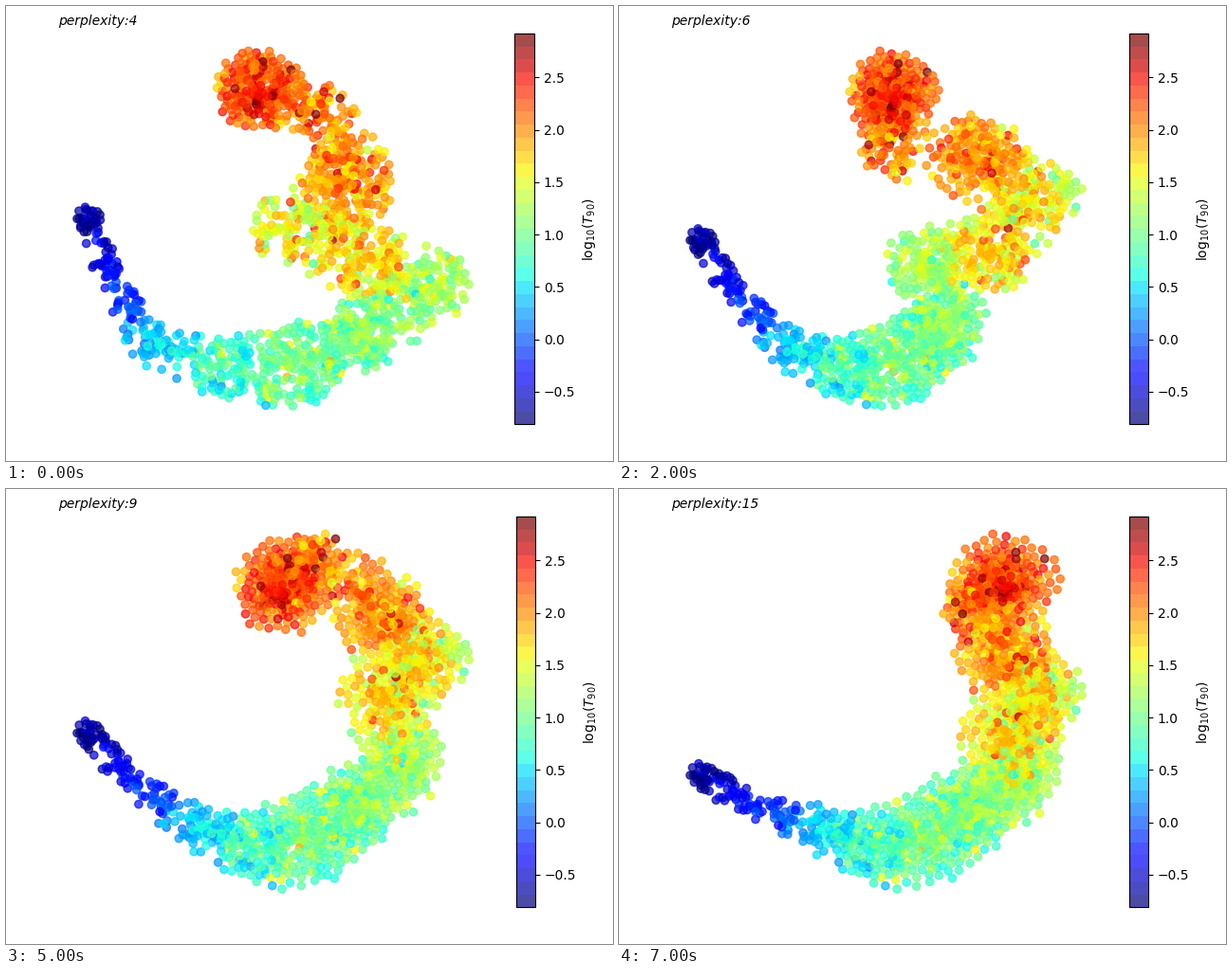
A matplotlib script that plays this animation: 640 px wide and 480 px high, repeating every 8 s.

```python
import numpy as np
import matplotlib.pyplot as plt
from matplotlib.animation import FuncAnimation

W, H, DPI = 640, 480, 100
PERPLEXITY = [4, 5, 6, 7, 8, 9, 10, 15]
STEPS = len(PERPLEXITY)
XLIM, YLIM = (75, 488), (47.5, 422)
VMIN, VMAX = -0.813, 2.921

# bends of the chain of points, from the shortest bursts to the longest
BENDS = {
    0: [(98, 218), (160, 352), (380, 342), (452, 290), (375, 262),
        (295, 228), (365, 180), (340, 103), (270, 80)],
    1: [(92, 228), (182, 356), (400, 345), (365, 295), (440, 262),
        (325, 220), (400, 170), (350, 98), (278, 80)],
    2: [(98, 240), (188, 357), (355, 335), (322, 262), (392, 255),
        (455, 195), (390, 155), (290, 142), (295, 82)],
    3: [(90, 203), (165, 338), (345, 360), (420, 318), (382, 268),
        (448, 222), (393, 168), (303, 142), (318, 88)],
    5: [(88, 268), (197, 366), (370, 342), (420, 300), (385, 228),
        (448, 195), (393, 150), (325, 80), (287, 118)],
    7: [(91, 309), (205, 368), (358, 345), (405, 315), (385, 265),
        (430, 225), (392, 180), (355, 118), (390, 92)],
}

# clumps along the chain: three to each of the first two links, then one per bend
CLUMP_AT = np.r_[np.arange(6) / 3, np.arange(2, 9)]
COUNT = [40, 38, 30, 60, 90, 170, 150, 110, 150, 100, 190, 75, 220]
RADIUS = [15, 16, 16, 25, 34, 46, 40, 35, 43, 33, 48, 28, 42]
VALUE = [-.62, -.35, 0, .45, .72, .98, 1.15, 1.25, 1.75, 1.55, 1.98, 2.08, 2.33]
CLUMPS = np.arange(len(COUNT))

rng = np.random.default_rng(90)
clump = rng.permutation(np.repeat(CLUMPS, COUNT))
total = len(clump)
along = rng.uniform(-1, 1, total)
depth = rng.random(total) ** .6          # 0 in the core, 1 on the rim
angle = rng.uniform(0, 2 * np.pi, total)


def chain_index(power):
    """Place on the chain; a higher power pulls points to their clump."""
    shift = .5 * np.sign(along) * np.abs(along) ** power
    return np.clip(clump + shift, 0, CLUMPS[-1])


index = chain_index(2)
radius = np.interp(index, CLUMPS, RADIUS)
values = np.interp(index, CLUMPS, VALUE)
values += rng.normal(size=total) * np.interp(index, [0, 6], [.1, .2])
values += .3 * (.5 - depth)
values += .6 * ((rng.random(total) < .04) & (index > 3.5))
values = np.clip(values, VMIN, VMAX)


def clump_centres(step):
    keys = list(BENDS)
    bends = np.array(list(BENDS.values())) @ [1, 1j]
    now = np.array([np.interp(step, keys, b) for b in bends.T])
    centres = np.interp(CLUMP_AT, np.arange(9), now)
    # the first two links sag
    f = CLUMP_AT % 1
    sag = np.where(CLUMP_AT < 1, 8, 36) * 4 * f * (1 - f)
    return centres + 1j * sag


def rescale(v, lo, hi):
    return lo + (hi - lo) * (v - v.min()) / np.ptp(v)


def layout(step):
    where = chain_index(3 - .25 * step)
    p = np.interp(where, CLUMPS, clump_centres(step))
    p = p + radius * depth * np.exp(1j * angle)
    # neighbours push apart, most on the rim and at high perplexity
    gap = np.minimum(radius / 40, 1) * (2 + depth * (5 + .8 * step)) / 2
    room = gap[:, None] + gap
    for _ in range(12):
        d = p[:, None] - p
        dist = np.abs(d) + 1e-6
        p = p + .18 * (d * np.maximum(room / dist - 1, 0)).sum(1)
    return np.column_stack([rescale(p.real, *XLIM), rescale(p.imag, *YLIM)])


layouts = [layout(i) for i in range(STEPS)]

fig = plt.figure(figsize=(W / DPI, H / DPI), dpi=DPI, facecolor="white")
ax = fig.add_axes([0, 0, 1, 1])
ax.set(xlim=(0, W), ylim=(H, 0))
ax.axis("off")
dots = ax.scatter(*layouts[0].T, c=values, cmap=plt.get_cmap("jet", 30),
                  vmin=VMIN, vmax=VMAX, alpha=.7)
title = ax.text(55, 20, "", fontsize=10, style="italic")

cax = fig.add_axes([.8, .1, .03, .8])
bar = fig.colorbar(dots, cax=cax)
bar.set_label(r"log$_{10}$($T_{90}$)")


def draw(i):
    dots.set_offsets(layouts[i])
    title.set_text(f"perplexity:{PERPLEXITY[i]}")
    # the bar settles a little to the right
    x = 537.6 - 1.2 * np.exp(-2 * i)
    cax.set_position([x / W, 1 - 441.3 / H, 20.6 / W, 412.3 / H])
    return dots, title


anim = FuncAnimation(fig, draw, frames=STEPS, interval=1000, repeat=True)
plt.show()
```
